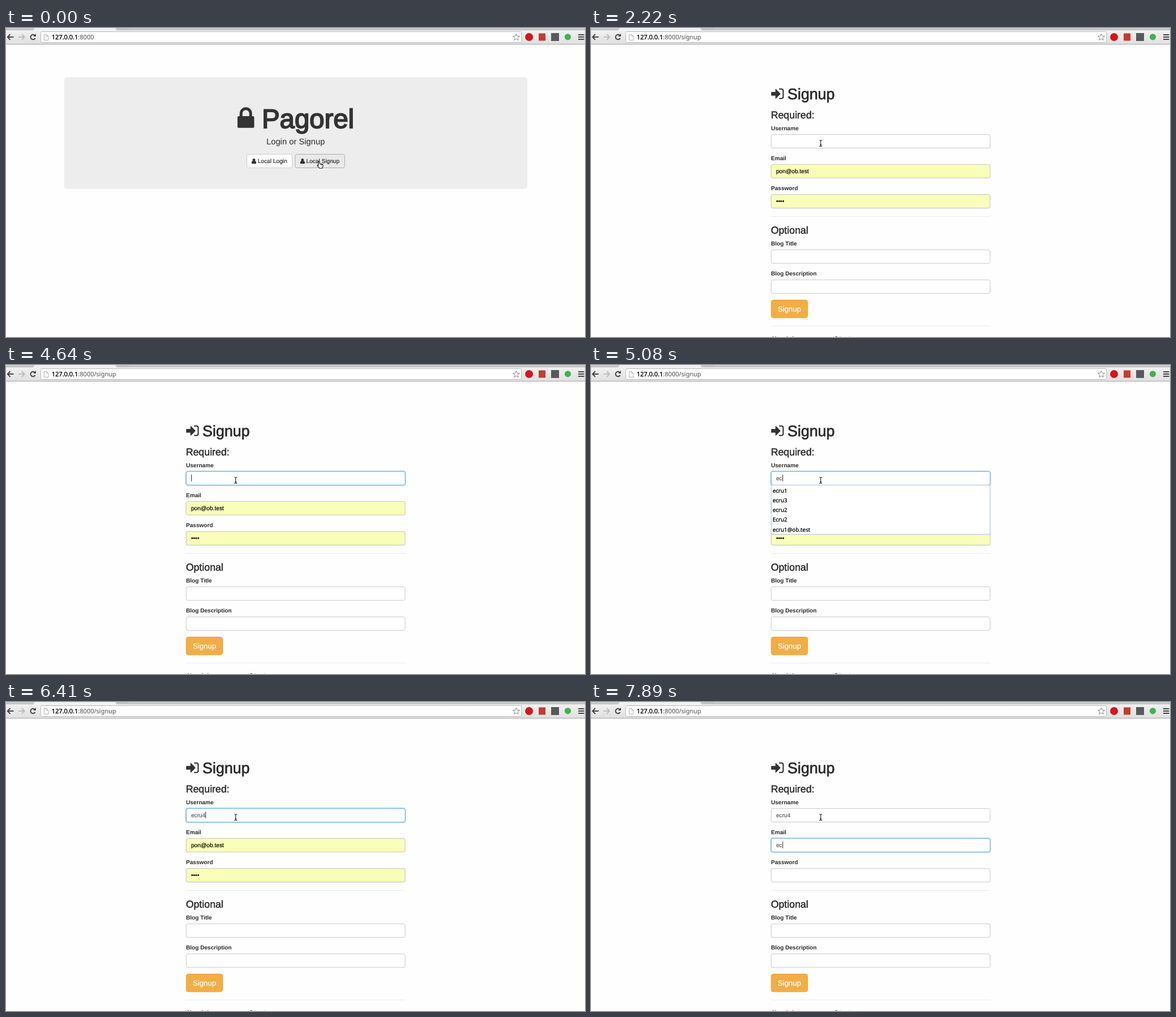
Write an HTML page that moves like this. It is 1025 by 547 pixels and loops after 8 s.

```html
<!DOCTYPE html>
<html lang="en">
<head>
<meta charset="utf-8">
<title>Signup form</title>
<style>
  html, body { margin: 0; width: 100%; height: 100%; overflow: hidden; background: #fefefe; }
  svg { display: block; }
  text {
    font: 10.2px "Liberation Sans", Arial, sans-serif;
    fill: #2b2b2b; white-space: pre; text-rendering: geometricPrecision;
  }
  .title { font-size: 47.4px; fill: #333; stroke: #333; stroke-width: 1.9px; }
  .h1 { font-size: 26.9px; stroke: #2b2b2b; stroke-width: .75px; }
  .h3 { font-size: 17.8px; stroke: #2b2b2b; stroke-width: .5px; }
  .lead { font-size: 14.75px; }
  .label { font-size: 10.1px; font-weight: bold; }
  .button { stroke: #2b2b2b; stroke-width: .2px; }
  .big { font-size: 13.2px; fill: #fff; stroke: #fff; stroke-width: .25px; }
  .typed { fill: #555; stroke: #555; stroke-width: .15px; }
  .filled { fill: #000; stroke: #000; stroke-width: .2px; }
  .url, .list text { font-family: "Noto Sans", "Open Sans", sans-serif; }
  .url { font-size: 11px; fill: #666; stroke: #666; stroke-width: .15px; }
  .host { fill: #000; stroke: #000; stroke-width: .3px; }
  .list text { font-size: 9.8px; fill: #000; stroke: #000; stroke-width: .25px; }
  .list rect { fill: #fff; stroke: #9dc0e4; }
  .rule { stroke: #ebebeb; }
  .ring { fill: none; stroke: #66afe9; }
  .ring .glow { stroke-width: 1.5px; opacity: .35; }
  .line { fill: none; stroke: #444; stroke-width: 2; }
  .caret { stroke: #333; }
</style>
</head>
<body>
<svg width="1025" height="547" viewBox="0 0 1025 547">
  <defs>
    <linearGradient id="bar" x2="0" y2="1">
      <stop stop-color="#f1f1f1"/><stop offset="1" stop-color="#e0e0e0"/>
    </linearGradient>
    <rect id="field" x="319" y="188.5" width="387.5" height="24" rx="3"/>
    <path id="person" fill="#333" d="M4.2 0a2.5 2.5 0 0 1 1.7 4.3C7.6 4.4 8.4 5.8 8.4 8Q8.4 9.3 7 9.3H1.4Q0 9.3 0 8C0 5.8 .8 4.4 2.5 4.3A2.5 2.5 0 0 1 4.2 0Z"/>
    <g id="ring" class="ring">
      <rect class="glow" x="317.8" y="187.3" width="389.9" height="26.4" rx="4"/>
      <use href="#field"/>
    </g>
  </defs>

  <!-- browser bar -->
  <rect width="1025" height="4" fill="#cbcbcb"/>
  <path d="M0 3.5H1025" stroke="#b4b4b4"/>
  <path d="M48 4L51 0H193L196 4Z" fill="#f2f2f2"/>
  <path d="M197 0H215Q217 0 217 1H200Q198 1 197 0Z" fill="#dcdcdc" stroke="#aaa" stroke-width=".6"/>
  <rect y="4" width="1025" height="24" fill="url(#bar)"/>
  <path d="M0 28.5H1025" stroke="#b3b3b3"/>
  <path d="M0 29.5H1025" stroke="#e6e6e6"/>
  <path class="line" d="M13.5 16H3M7.5 11L2.8 16L7.5 21"/>
  <path class="line" style="stroke:#bdbdbd" d="M22 16H32.5M28 11L32.7 16L28 21"/>
  <path class="line" d="M51.6 18A4.3 4.3 0 1 1 50.6 12.8"/>
  <path d="M53 10V15H48Z" fill="#444"/>
  <rect x="61.5" y="6.5" width="851" height="19" rx="2" fill="#fff" stroke="#b9b9b9"/>
  <path d="M67.5 11.5H72L75 14.5V21.5H67.5ZM72 11.5V14.5H75" fill="#fff" stroke="#aaa" stroke-width=".9"/>
  <text class="url" x="81" y="20"><tspan class="host">127.0.0.1</tspan>:8000<tspan data-on="1200-8000">/signup</tspan></text>
  <path id="star" fill="#fff" stroke="#888"/>
  <circle cx="926" cy="16" r="7" fill="#d5161c"/>
  <rect x="943" y="9.5" width="12" height="13" fill="#c83a2e"/>
  <rect x="965" y="9" width="14" height="14" fill="#58595b"/>
  <circle cx="994.5" cy="15.8" r="5.6" fill="#43b051"/>
  <path class="line" d="M1013 12H1023.5M1013 16H1023.5M1013 20H1023.5"/>

  <!-- landing page -->
  <g data-on="0-1200">
    <rect x="103" y="87" width="820" height="198" rx="5" fill="#ededed"/>
    <rect x="409.8" y="156" width="29.6" height="20.8" rx="2.6" fill="#333"/>
    <path d="M416.1 158V151.2a8.5 8.5 0 0 1 17 0V158" fill="none" stroke="#333" stroke-width="5"/>
    <text class="title" x="453" y="176.6">Pagorel</text>
    <text class="lead" x="461" y="206">Login or Signup</text>
    <rect x="426.5" y="223.5" width="80" height="24" rx="3" fill="#fff" stroke="#ccc"/>
    <use href="#person" x="434.7" y="231"/>
    <text class="button" x="445.7" y="239.2">Local Login</text>
    <rect x="512" y="223.5" width="87.5" height="24" rx="3" fill="#e9e9e9" stroke="#adadad"/>
    <use href="#person" x="520.7" y="231"/>
    <text class="button" x="531.5" y="239.2">Local Signup</text>
  </g>

  <!-- signup page -->
  <g data-on="1200-8000">
    <path d="M319 113.3H326.5V108.6Q326.6 107.6 327.6 108.3L335 115.7Q335.6 116.5 335 117.2L327.6 124.7Q326.6 125.3 326.5 124.3V119.8H319Z" fill="#333"/>
    <path d="M333 108H337.2Q340.2 108 340.2 111V121.8Q340.2 124.8 337.2 124.8H333" fill="none" stroke="#333" stroke-width="2.1"/>
    <text class="h1" x="347.8" y="125.8">Signup</text>
    <text class="h3" x="318.4" y="160">Required:</text>
    <text class="h3" x="318.4" y="364.2">Optional</text>
    <text class="label" x="318.7" y="180.7">Username</text>
    <text class="label" x="318.7" y="234">Email</text>
    <text class="label" x="318.7" y="287.2">Password</text>
    <text class="label" x="318.7" y="385.2">Blog Title</text>
    <text class="label" x="318.7" y="438.4">Blog Description</text>
    <g fill="#fff" stroke="#c8c8c8">
      <use href="#field"/>
      <use href="#field" y="53"/>
      <use href="#field" y="106.3"/>
      <use href="#field" y="204.2"/>
      <use href="#field" y="257.4"/>
    </g>
    <g data-on="1440-7890" fill="#f9feb9" stroke="#c8c8c8">
      <use href="#field" y="53"/>
      <use href="#field" y="106.3"/>
    </g>
    <rect data-on="7000-7890" x="327.7" y="247" width="59" height="13" fill="#b5d5fd"/>
    <g data-on="1440-7890">
      <text class="filled" x="327.7" y="257">pon@ob.test</text>
      <text class="filled" x="327.7" y="310">••••</text>
    </g>
    <path class="rule" d="M319 333.5H707M319 527.5H707"/>
    <rect x="319" y="481.5" width="64.5" height="31.5" rx="4" fill="#f2ae45" stroke="#eea236"/>
    <text class="big" x="330.8" y="501.6">Signup</text>
    <text x="319" y="553">Already have an account? <tspan fill="#428bca">Login</tspan></text>

    <use href="#ring" data-on="2700-7000"/>
    <use href="#ring" data-on="7000-7150" opacity=".5"/>
    <use href="#ring" data-on="7000-7150" y="53" opacity=".5"/>
    <use href="#ring" data-on="7150-8000" y="53"/>
    <text class="typed" id="user" x="327.7" y="204"></text>
    <text class="typed" id="mail" x="327.7" y="257"></text>
    <path class="caret" id="caret" data-on="2520-3140 3590-4040 4640-5670 6270-6860 7890-8000" d="M.5 0V12"/>

    <g class="list" data-on="4930-6410">
      <rect x="319" y="212.5" width="387.5" height="87.3"/>
      <g id="names"></g>
    </g>
    <g class="list" data-on="4930-5080">
      <path d="M319 299.5V317.5H706.5V299.5" fill="#fff" stroke="#9dc0e4"/>
      <path d="M319.5 299.7H706" stroke="#fff" stroke-width="2"/>
      <text x="321.5" y="312">entry</text>
    </g>
  </g>

  <!-- mouse -->
  <path data-on="0-1770" transform="translate(550.5 235)" fill="#fff" stroke="#111" stroke-width="1.1" stroke-linejoin="round"
    d="M2.6 8.6V2.2Q2.6 1 3.7 1T4.9 2.2V5.2L9.4 6Q10.8 6.3 10.7 7.8L10.3 10.6L9.3 13.2H4.5L.9 9.3Q.2 8.1 1.2 7.7Q1.8 7.5 2.6 8.6ZM6.9 5.6V7.8M8.8 5.9V8"/>
  <path data-on="1770-1920" transform="translate(458.5 217)" fill="#111" stroke="#fff" stroke-width=".8"
    d="M0 0V11L2.5 8.7L4.2 12.6L6 11.8L4.4 8H8Z"/>
  <path id="beam" data-on="1920-8000" fill="none" stroke="#222" stroke-width="1.1" d="M0 .5Q2.5 .5 2.5 2.5V9.5Q2.5 11.5 0 11.5M5 .5Q2.5 .5 2.5 2.5M2.5 9.5Q2.5 11.5 5 11.5M1 8.5H4"/>
</svg>
<script>
  const LOOP = 8000;
  const el = id => document.getElementById(id);
  const place = (node, x, y) => node.setAttribute("transform", `translate(${x} ${y})`);

  // last value whose start time has passed
  const at = (steps, t) => steps.reduce((value, [start, next]) => t >= start ? next : value, steps[0][1]);

  const timed = [...document.querySelectorAll("[data-on]")].map(node => ({
    node,
    spans: node.dataset.on.split(" ").map(span => span.split("-").map(Number))
  }));

  const userText = [[0, ""], [4930, "e"], [5080, "ec"], [5220, "ecru"], [6410, "ecru4"]];
  const mailText = [[0, ""], [7890, "ec"]];
  const caretPos = [[0, [328, 194]], [4930, [333, 194]], [5080, [339, 194]], [5220, [347, 194]],
    [6410, [353, 194]], [7000, [339, 247]]];
  const beamPos = [[0, [416.5, 203]], [2070, [404.2, 199]], [2220, [404.2, 198]]];

  ["ecru1", "ecru3", "ecru2", "Ecru2", "ecru1@ob.test"].forEach((name, i) => {
    const row = document.createElementNS("http://www.w3.org/2000/svg", "text");
    row.setAttribute("x", 321.5);
    row.setAttribute("y", 225.5 + i * 17.25);
    row.textContent = name;
    el("names").append(row);
  });

  const starPoints = Array.from({ length: 10 }, (_, i) => {
    const r = i % 2 ? 2.8 : 6.4, a = i * Math.PI / 5;
    return `${903.3 + r * Math.sin(a)} ${16.5 - r * Math.cos(a)}`;
  });
  el("star").setAttribute("d", `M${starPoints.join("L")}Z`);

  function draw(t) {
    for (const { node, spans } of timed) {
      node.style.display = spans.some(([from, to]) => t >= from && t < to) ? "" : "none";
    }
    el("user").textContent = at(userText, t);
    el("mail").textContent = at(mailText, t);
    place(el("caret"), ...at(caretPos, t));
    place(el("beam"), ...at(beamPos, t));
  }

  const begin = performance.now();
  function tick() {
    draw((performance.now() - begin) % LOOP);
    requestAnimationFrame(tick);
  }
  tick();
</script>
</body>
</html>
```
